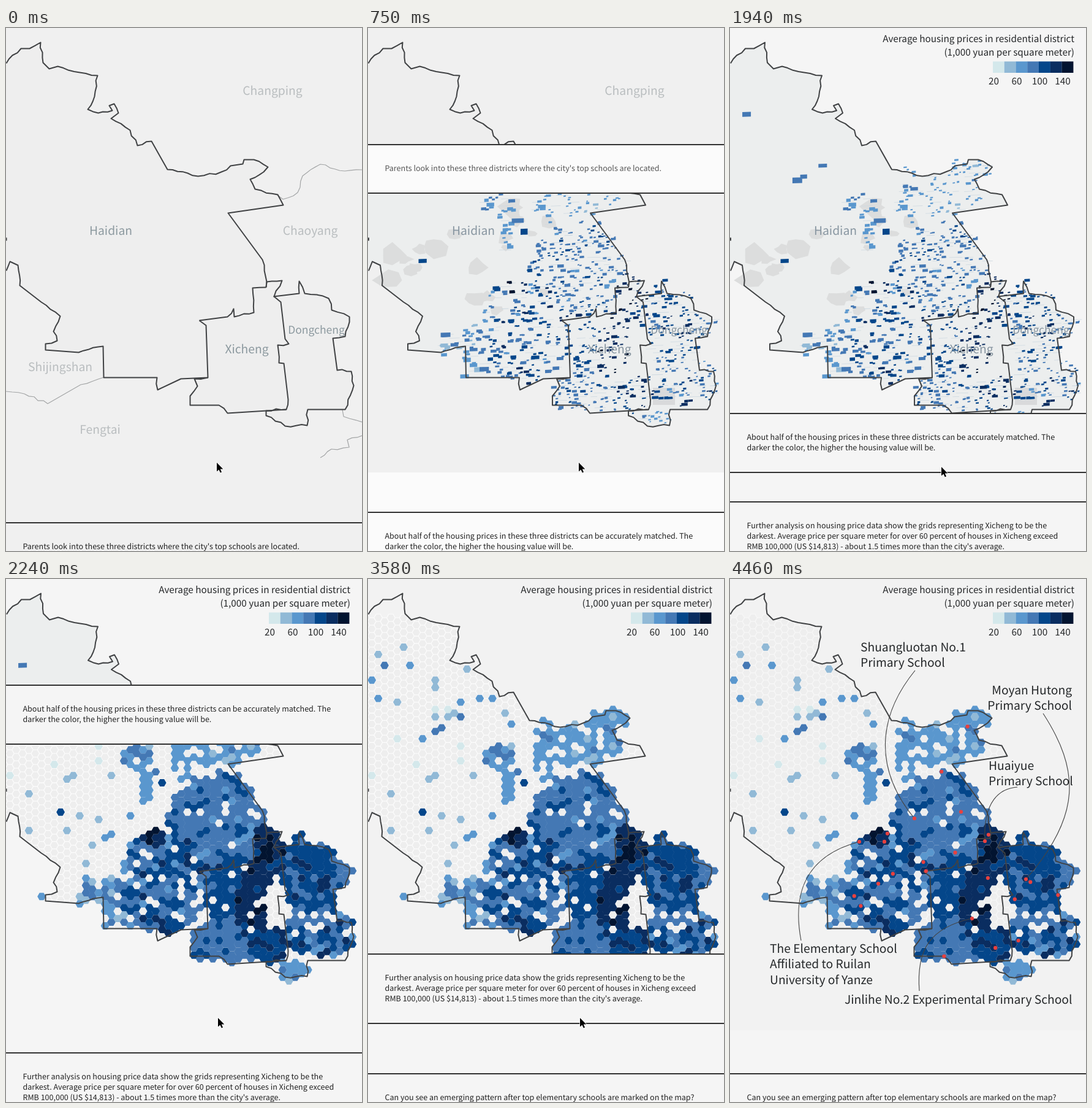
An HTML page that plays this animation: 581 px wide and 852 px high, repeating every 5060 ms.

```html
<!DOCTYPE html>
<html lang="en">
<head>
<meta charset="utf-8">
<title>Housing prices and schools</title>
<style>
html, body { margin: 0; width: 100%; height: 100%; overflow: hidden; background: #f0f0f0; }
svg { display: block; width: 581px; height: 852px; }
text { font-family: "Noto Sans CJK SC", "Noto Sans CJK JP", "Noto Sans CJK", "Noto Sans", sans-serif; text-rendering: geometricPrecision; }
.border { fill: none; stroke: #404244; stroke-width: 2; stroke-linejoin: round; }
.thin { fill: none; stroke: #a3a5a6; stroke-width: 1.2; stroke-linejoin: round; }
.link { fill: none; stroke: #444; stroke-width: 1.1; }
.legend { font-size: 15.3px; fill: #26282a; }
.school { font-size: 19.25px; fill: #25282a; }
.caption { font-size: 12.53px; }
</style>
</head>
<body>
<svg id="stage" viewBox="0 0 581 852"></svg>
<script>
const W = 581, H = 852, LOOP = 5060;
const stage = document.getElementById('stage');

function el(tag, attrs, parent, text) {
  const node = document.createElementNS('http://www.w3.org/2000/svg', tag);
  for (const name in attrs) node.setAttribute(name, attrs[name]);
  if (text) node.textContent = text;
  parent.append(node);
  return node;
}

function rng(seed) {
  return () => {
    seed = (seed + 0x6d2b79f5) | 0;
    let t = Math.imul(seed ^ (seed >>> 15), 1 | seed);
    t = (t + Math.imul(t ^ (t >>> 7), 61 | t)) ^ t;
    return ((t ^ (t >>> 14)) >>> 0) / 4294967296;
  };
}

const choose = (list, rand) => list[Math.floor(rand() * list.length)];

function inside(poly, x, y) {
  let hit = false;
  poly.forEach(([ax, ay], i) => {
    const [bx, by] = poly[(i + 1) % poly.length];
    if ((ay > y) !== (by > y) && x < (bx - ax) * (y - ay) / (by - ay) + ax) hit = !hit;
  });
  return hit;
}

// A border from its main corners; medium legs get small jogs, long ones stay straight
const jog = rng(3);
function border(corners) {
  const pts = corners.split(/\s+/).map(p => p.split(',').map(Number));
  return pts.flatMap(([x, y], i) => {
    if (!i) return [[x, y]];
    const [px, py] = pts[i - 1], len = Math.hypot(x - px, y - py);
    const n = len > 16 && len < 42 ? Math.round(len / 9) : 1;
    return Array.from({ length: n }, (_, k) => {
      const f = (k + 1) / n, off = k + 1 < n ? jog() * 4 - 2 : 0;
      return [px + (x - px) * f + off * (y - py) / len, py + (y - py) * f - off * (x - px) / len];
    });
  });
}

const north = border(`0,57 10,44 24,33 38,33 56,23 60,56 70,66 84,62 120,72 149,77 144,111 133,132 150,138
  173,134 168,126 176,123 183,138 171,147 202,166 214,191 237,184 263,230 296,236 313,241 351,234 366,224
  386,221 388,214 404,214 427,226 420,234 398,246 406,262 443,271 452,288 362,301 418,377 425,413 424,422`);
const southWest = border(`0,395 6,380 19,386 22,419 57,446 88,469 77,494 83,509 64,514 64,524 118,528 158,518
  159,569 246,569 247,589 285,571 329,569 326,484 315,476`);
const xichengTop = border('315,476 361,470 371,457 372,470 404,463 402,423 424,422');
const xichengRest = border(`424,422 425,413 450,411 437,437 448,446 455,506 461,514 443,516 445,545 453,546
  460,605 457,621 361,627 347,614 300,614 300,599 312,583 307,571 329,569`);
const dongcheng = border(`436,437 478,432 478,412 487,432 526,440 531,459 560,470 553,502 533,505 540,557
  563,559 567,582 553,621 492,621 491,647 455,648 424,631 424,623 457,621`);
const outerLines = [
  '440,270 452,279 476,268 484,241 513,222 553,233 581,231',
  '0,592 30,596 68,612 122,581 160,569',
  '549,622 551,633 581,642',
  '513,700 531,686 560,683 557,671 581,664'
].map(border);

const haidian = [...north, ...[...xichengTop].reverse(), ...[...southWest].reverse()];
const land = [haidian, [...xichengTop, ...xichengRest], dongcheng];
const nearLand = (x, y) => [-6, 0, 6].some(d => land.some(p => inside(p, x + d, y) || inside(p, x, y + d)));

// Price levels, light to dark
const COLORS = ['#d4e8eb', '#91b9d6', '#5a97ce', '#4478b4', '#04468a', '#0a2d60', '#021430'];

// Oval zones: price levels found there ('.' is an empty cell), centre, radii; later zones win
const ZONES = [
  ['2233.', 214, 292, 27, 24],
  ['223.', 228, 325, 12, 45],
  ['2223.', 288, 282, 19, 54],
  ['2222213.', 355, 270, 58, 38],
  ['222221', 396, 220, 44, 20],
  ['22313..', 160, 530, 42, 48],
  ['333333332344.', 352, 400, 90, 86],
  ['33344444325..', 258, 492, 76, 86],
  ['55556', 244, 421, 21, 17],
  ['44444444543.', 378, 512, 55, 62],
  ['33333333334', 355, 593, 62, 38],
  ['55555554546.', 404, 522, 34, 64],
  ['5544445', 427, 597, 36, 30],
  ['555556464', 428, 440, 27, 46],
  ['444444453', 502, 482, 56, 74],
  ['33342', 548, 480, 20, 36],
  ['33434245..', 516, 578, 58, 38],
  ['22213..', 470, 635, 36, 24],
  ['34....', 496, 556, 40, 14],
  ['.', 441, 522, 14, 32]
];

// Hexagon grid, flat side up
const DX = 10.35, DY = 11.95;
const hexPath = (x, y) => `M${(x - 6.9).toFixed(1)} ${y.toFixed(1)}l3.45-5.97h6.9l3.45 5.97l-3.45 5.97h-6.9z`;
const cells = [];
const rand = rng(11);
let backHexes = '';
for (let c = 0; c < 57; c++) {
  for (let r = -3; r < 47; r++) {
    const x = -4 + DX * c, y = 99 + DY * (r + (c & 1) / 2);
    if (!nearLand(x, y)) continue;
    backHexes += hexPath(x, y);
    const zone = ZONES.findLast(([, cx, cy, rx, ry]) => Math.hypot((x - cx) / rx, (y - cy) / ry) < 1);
    const scattered = !zone && x < 260 && y > 90 && rand() < 0.06;
    const level = zone ? choose(zone[0], rand) : scattered ? choose('0111122234', rand) : '.';
    if (level !== '.') cells.push({ x, y, level: +level, dense: !!zone });
  }
}

const defs = el('defs', {}, stage);
const landClip = el('clipPath', { id: 'land' }, defs);
land.forEach(p => el('polygon', { points: p.join(' ') }, landClip));
const lowRect = el('rect', { width: W, height: H }, el('clipPath', { id: 'low' }, defs));

function drawLand(map, fill) {
  land.forEach(p => el('polygon', { points: p.join(' '), fill }, map));
}

function drawBorders(map, shift = 0.5) {
  const g = el('g', { class: 'border', transform: `translate(${shift} 0.5)` }, map);
  [north, southWest, xichengTop, xichengRest, dongcheng].forEach(p => el('polyline', { points: p.join(' ') }, g));
  el('path', { d: 'M0 341v5' }, g);
}

function drawLabel(map, text, x, y, fill, size = 19.3) {
  el('text', { x, y, fill, 'font-size': size, 'text-anchor': 'middle' }, map, text);
}

function drawDistricts(map, fill, shift = 0) {
  drawLabel(map, 'Haidian', 171 + shift, 336.5, fill);
  drawLabel(map, 'Xicheng', 393 + shift, 530, fill);
  drawLabel(map, 'Dongcheng', 506.5 + shift, 498, fill, 17.5);
}

function drawLegend(map) {
  const line = (text, x, y, anchor) => el('text', { x, y, class: 'legend', 'text-anchor': anchor }, map, text);
  line('Average housing prices in residential district', 562, 23, 'end');
  line('(1,000 yuan per square meter)', 562, 44.5, 'end');
  COLORS.forEach((fill, i) => el('rect', { x: 429 + 18.75 * i, y: 54.5, width: 18.9, height: 18.5, fill }, map));
  [20, 60, 100, 140].forEach((n, i) => line(String(n), 430.5 + 37.5 * i, 91.5, 'middle'));
}

function drawParks(map, rand) {
  for (let i = 0; i < 22; i++) {
    const cx = 10 + rand() * 290, cy = 285 + rand() * 110 + (i % 4 ? 0 : 90), size = 5 + rand() * 14;
    if (!inside(haidian, cx, cy)) continue;
    const edge = Array.from({ length: 8 }, (_, k) => {
      const d = size * (0.6 + rand() * 0.7), a = k * Math.PI / 4;
      return [cx + d * 1.3 * Math.cos(a), cy + d * Math.sin(a)];
    });
    el('polygon', { points: edge.join(' '), fill: '#dcdddd' }, map);
  }
  el('rect', { x: 465, y: 586, width: 36, height: 28, fill: '#d9dadb' }, map);
}

// Each priced cell holds a few buildings, larger towards the west
function drawBlocks(map) {
  const rand = rng(5), paths = COLORS.map(() => '');
  let streets = '';
  const rect = (x, y, w, h) => `M${(x - w / 2).toFixed(1)} ${(y - h / 2).toFixed(1)}l${w.toFixed(1)}-.5v${h.toFixed(1)}l${(-w).toFixed(1)} .5z`;
  drawParks(map, rand);
  for (const { x, y, level, dense } of cells) {
    if (!dense) {
      if (level > 2) paths[level] += rect(x, y, 8 + rand() * 12, 5 + rand() * 5);
      continue;
    }
    if (rand() < 0.3) streets += rect(x, y, 8 + rand() * 14, 0.8);
    if (rand() < 0.3) continue;
    const scale = Math.max(0.9, 2.1 - x / 270);
    for (let i = 0; i < 2; i++) {
      const size = scale * (1 + rand() * rand() * 2.2);
      paths[level] += rect(x + rand() * 9 - 4.5, y + rand() * 9 - 4.5, size * (2.5 + rand() * 2), size * 1.9);
    }
  }
  el('path', { d: streets, fill: '#cdd8e0' }, map);
  paths.forEach((d, i) => el('path', { d, fill: COLORS[i] }, map));
}

function drawHexes(map, stroke) {
  el('path', { d: backHexes, fill: '#eee', stroke, 'stroke-width': 1.2, 'clip-path': 'url(#land)' }, map);
  const paths = COLORS.map(() => '');
  for (const { x, y, level } of cells) paths[level] += hexPath(x, y);
  paths.forEach((d, i) => el('path', { d, fill: COLORS[i] }, map));
}

function drawSchools(map) {
  const dot = (cx, cy) => el('circle', { cx, cy, r: 3.1, fill: '#e8413f' }, map);
  const name = (x, y, anchor, lines, link) => {
    el('path', { d: link, class: 'link' }, map);
    dot(...link.match(/\d+/g).slice(-2));
    lines.forEach((text, i) => el('text', { x, y: y + 25.4 * i, class: 'school', 'text-anchor': anchor }, map, text));
  };
  const rand = rng(8), urban = cells.filter(c => c.dense && c.level > 2);
  for (let i = 0; i < 20; i++) {
    const { x, y } = choose(urban, rand);
    dot(x + rand() * 6 - 3, y + rand() * 6 - 3);
  }
  name(213, 117.5, 'start', ['Shuangluotan No.1', 'Primary School'], 'M302 149C240 225 235 310 301 390');
  name(558, 188, 'end', ['Moyan Hutong', 'Primary School'], 'M511 219C570 310 575 385 483 489');
  name(422, 310.5, 'start', ['Huaiyue', 'Primary School'], 'M469 339C440 341 413 362 416 427');
  name(65, 609, 'start', ['The Elementary School', 'Affiliated to Ruilan', 'University of Yanze'],
    'M116 589C102 515 120 452 211 428');
  name(187, 692, 'start', ['Jinlihe No.2 Experimental Primary School'], 'M309 671C304 605 325 568 395 553');
}

const maps = [0, 1, 2, 3].map(() => {
  const g = el('g', {}, stage);
  g.back = el('rect', { width: W, height: H }, g);
  return g;
});
const [plain, blocks, hexes, schools] = maps;

drawLand(plain, '#eeeeee');
outerLines.forEach(p => el('polyline', { points: p.join(' '), class: 'thin' }, plain));
drawBorders(plain);
drawDistricts(plain, '#8c999f');
drawLabel(plain, 'Changping', 435, 108.5, '#b9bdbf');
drawLabel(plain, 'Chaoyang', 496.5, 337, '#b9bdbf');
drawLabel(plain, 'Shijingshan', 88.5, 559, '#b9bdbf');
drawLabel(plain, 'Fengtai', 153.5, 661, '#b9bdbf');

drawLand(blocks, '#eceeee');
drawBlocks(blocks);
drawBorders(blocks, 1);
drawDistricts(blocks, '#8795a0', 1);
drawLegend(blocks);

drawHexes(hexes, '#fcfcfc');
drawBorders(hexes);
drawLegend(hexes);

drawHexes(schools, '#f8f8f8');
drawBorders(schools);
drawLegend(schools);
drawSchools(schools);

// Captions rest at the foot of the stage and scroll away upwards
const strip = el('rect', { width: W, height: H }, stage);
const captions = [
  ["Parents look into these three districts where the city's top schools are located."],
  ['About half of the housing prices in these three districts can be accurately matched. The',
    'darker the color, the higher the housing value will be.'],
  ['Further analysis on housing price data show the grids representing Xicheng to be the',
    'darkest. Average price per square meter for over 60 percent of houses in Xicheng exceed',
    "RMB 100,000 (US $14,813) - about 1.5 times more than the city's average."],
  ['Can you see an emerging pattern after top elementary schools are marked on the map?']
].map(lines => {
  const g = el('g', {}, stage);
  g.size = 64 + 17 * lines.length;
  g.rest = 822 - 17 * lines.length;
  g.back = el('rect', { width: W, height: g.size }, g);
  [0, g.size - 2].forEach(y => el('rect', { y, width: W, height: 2, fill: '#333' }, g));
  lines.forEach((text, i) => el('text', { x: 27.5, y: 44 + 17 * i, class: 'caption' }, g, text));
  return g;
});

const cursor = el('path', {
  d: 'M0 0V14.5L3.4 11.4L5.8 16.6L8 15.6L5.7 10.6H10.3Z',
  fill: '#000', stroke: '#fff', 'stroke-width': 1.4, 'paint-order': 'stroke'
}, stage);

const MAP_SHADES = ['#f0f0f0', '#f5f5f5', '#f2f2f2', '#f2f2f2'];
const PAGE_SHADES = ['#f0f0f0', '#fbfbfb', '#f5f5f5', '#f5f5f5'];
const SCROLLS = [450, 1940, 3580];
const TICK = 146;
const LIFTS = [161, 399, 616, 855];
// time, x, y; no position hides it
const CURSOR = [[0, 344, 708], [1050, 343, 712], [1200, 345, 715], [2240, 346, 715], [4170, 356, 728], [4320, 448, 823], [4460]];

function show(t) {
  const next = SCROLLS.filter(s => s <= t).length;
  const lift = next ? LIFTS[Math.floor((t - SCROLLS[next - 1]) / TICK)] : undefined;
  const moving = lift !== undefined, chapter = moving ? next - 1 : next;
  const top = moving ? captions[chapter].rest - lift : 0;

  maps.forEach((map, i) => {
    map.style.display = i === chapter || i === next ? '' : 'none';
    map.back.setAttribute('fill', MAP_SHADES[chapter]);
    if (i > chapter) map.setAttribute('clip-path', 'url(#low)');
    else map.removeAttribute('clip-path');
  });
  lowRect.setAttribute('y', top + captions[chapter].size);

  captions.forEach((box, i) => {
    const slides = moving && i === chapter;
    box.style.display = slides || i === next ? '' : 'none';
    box.setAttribute('transform', `translate(0 ${slides ? top : box.rest})`);
    box.setAttribute('fill', slides && !chapter ? '#555' : '#222');
    box.back.setAttribute('fill', PAGE_SHADES[next]);
  });
  strip.setAttribute('y', moving ? 724 : 735);
  strip.setAttribute('fill', PAGE_SHADES[next]);

  const [, x, y] = CURSOR.findLast(c => c[0] <= t);
  cursor.style.display = x ? '' : 'none';
  if (x) cursor.setAttribute('transform', `translate(${x} ${y})`);
}

const start = performance.now();
function tick() {
  show((performance.now() - start) % LOOP);
  requestAnimationFrame(tick);
}
tick();
</script>
</body>
</html>
```
